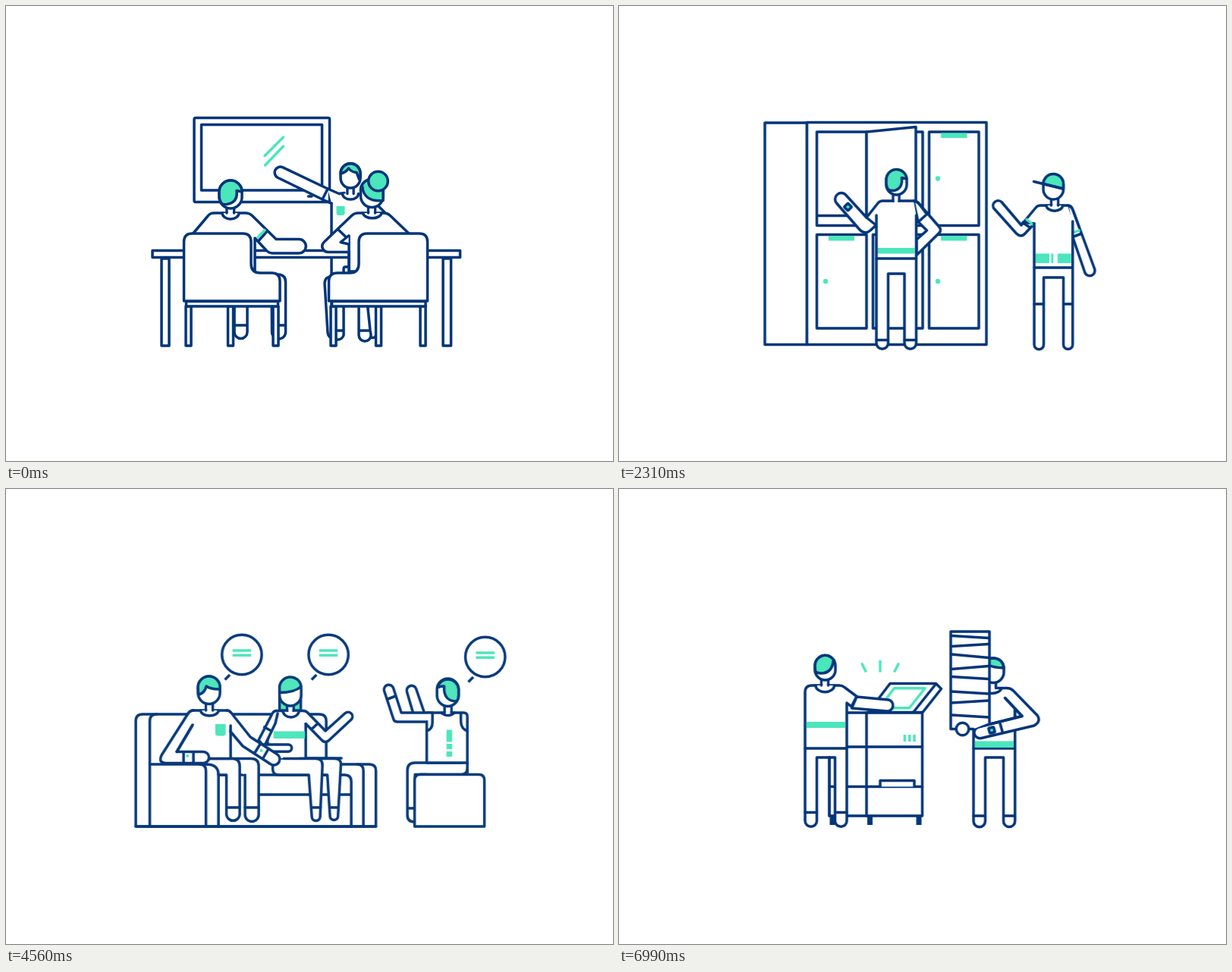
Animation of 800 by 600 pixels, one loop 8 s. Source, as an HTML page:

```html
<!DOCTYPE html>
<html lang="en">
<head>
<meta charset="utf-8">
<title>Office scenes</title>
<style>
html, body { margin: 0; width: 100%; height: 100%; overflow: hidden; background: #fff; }
svg { display: block; width: 100%; height: 100%; }
.scene {
  fill: #fff; stroke: #003579; stroke-width: 3.5;
  stroke-linecap: round; stroke-linejoin: round;
  animation: 8s linear infinite both;
}
.n { fill: none; }
.g { fill: #4be6bb; }
.p { fill: #4be6bb; stroke: none; }
.l { fill: none; stroke: #4be6bb; stroke-width: 3.4; stroke-linecap: butt; }
.w { stroke: none; }
.d { fill: #003579; stroke: none; }
.b { stroke-linecap: butt; }

#meeting { animation-name: meeting; }
#lockers { animation-name: lockers; }
#sofa { animation-name: sofa; }
#copier { animation-name: copier; }

/* leave: ease in over 505 ms; enter: ease out over 480 ms */
@keyframes meeting {
  0% { transform: none; opacity: 1; }
  13.5625% { transform: none; opacity: 1; animation-timing-function: cubic-bezier(.42, 0, .9, .9); }
  19.875%, 100% { transform: translateX(-247px); opacity: 0; }
}
@keyframes lockers {
  0%, 23.25% { transform: translateX(203px); opacity: 0; animation-timing-function: cubic-bezier(.215, .61, .355, 1); }
  29.25% { transform: none; opacity: 1; }
  42.8125% { transform: none; opacity: 1; animation-timing-function: cubic-bezier(.42, 0, .9, .9); }
  49.125%, 100% { transform: translateX(-247px); opacity: 0; }
}
@keyframes sofa {
  0%, 52.5% { transform: translateX(203px); opacity: 0; animation-timing-function: cubic-bezier(.215, .61, .355, 1); }
  58.5% { transform: none; opacity: 1; }
  72.0625% { transform: none; opacity: 1; animation-timing-function: cubic-bezier(.42, 0, .9, .9); }
  78.375%, 100% { transform: translateX(-247px); opacity: 0; }
}
@keyframes copier {
  0%, 81.75% { transform: translateX(203px); opacity: 0; animation-timing-function: cubic-bezier(.215, .61, .355, 1); }
  87.75%, 100% { transform: none; opacity: 1; }
}
</style>
</head>
<body>
<svg viewBox="0 0 800 600" xmlns="http://www.w3.org/2000/svg">

<g class="scene" id="meeting">
  <!-- screen -->
  <rect x="248" y="147.5" width="178.5" height="111" rx="2"/>
  <rect x="257.5" y="156.5" width="159" height="86.5"/>
  <path class="l" style="stroke-linecap:round" d="M341 197.500L365.500 173M341.500 210L365.500 185"/>
  <path d="M398.500 251H403"/>
  <!-- presenter -->
  <path class="w" d="M429 260L424 241L440 247.500H470L499 272V358H429Z"/>
  <path class="n" d="M429 260V358M424 241L439 247.500L446 246.500M490 263L499 272M445 352V346.500Q445 344 447.500 344H452"/>
  <path d="M424 241L364.500 212.700A7.500 7.500 0 0 0 358 226.200L417 255Z"/>
  <path class="n" d="M417 255L429 260.500"/>
  <path d="M443.500 247.500A10.500 7.500 0 0 0 464.500 247.500"/>
  <path d="M450 238V247.500M458 238V247.500"/>
  <path class="w" d="M451.750 238H456.250V250H451.750Z"/>
  <rect x="441" y="207.500" width="26" height="32.500" rx="13"/>
  <path class="g" d="M441 221A13 13 0 0 1 467 221V226L465.500 228.500L462 219.500Q456 219.500 451.500 214Q448 219.500 441 221Z"/>
  <path class="p" d="M435.500 264H446.500V273Q446.500 276 443.500 276H438.500Q435.500 276 435.500 273Z"/>
  <!-- table -->
  <rect x="205" y="333" width="10" height="115"/>
  <rect x="576" y="333" width="10.500" height="115"/>
  <rect x="193" y="322.500" width="405.500" height="9"/>
  <!-- left listener -->
  <path d="M301 390V430A8.500 8.500 0 0 0 318 430V390M301 421H318"/>
  <path d="M350 354H358Q368.500 354 368.500 364V430A9 9 0 0 1 350.500 430ZM351 421H368.500"/>
  <path d="M247 299.500L266 277Q269 273 274 273H316Q321 273 325 277L356 307.500H386A9.200 9.200 0 0 1 386 326H351Q346 326 342 321L328 306V350H247Z"/>
  <path class="n" d="M344.500 296.500L333.500 309"/>
  <path class="l" d="M342 294.500L331 306"/>
  <path d="M285 273A11 8 0 0 0 307 273"/>
  <path d="M291 264V273M300.500 264V273"/>
  <path class="w" d="M292.750 264H298.750V275H292.750Z"/>
  <rect x="281" y="230" width="30" height="37" rx="15"/>
  <path class="g" d="M281 245A15 15 0 0 1 311 245L304 243.500Q306 259 291 261.500Q287 262 285 261Q281 257 281 250Z"/>
  <!-- right listener -->
  <path d="M434 357Q420 355 420 366L424 431Q425 438 432 438V357Z"/>
  <path d="M429 390V434A8.300 8.300 0 0 0 445 434V390M430 428H445"/>
  <path d="M476 390L479 431Q480 438 484 437.500Q488 437 488 432V390Z"/>
  <path d="M465 390V434A8 8 0 0 0 481 434L480 428L476 390ZM465 428H480"/>
  <path d="M530.500 299.500L507 277Q503 273 498 273H464Q459 273 455 277L420 310.500Q415 315 417.500 320Q419.500 324.500 425 324.500H452V350H530Z"/>
  <path class="n" d="M437.500 294.500L449.500 306M452 303V350"/>
  <path d="M451.500 303L441 311.500L451.500 314"/>
  <path d="M470.500 273A12.300 7.500 0 0 0 495 273"/>
  <path d="M477.500 262V273M486.500 262V273"/>
  <path class="w" d="M479.250 262H484.750V275H479.250Z"/>
  <rect x="467.500" y="228.500" width="29.500" height="37" rx="14.700"/>
  <path class="g" d="M467.500 243A14.700 14.700 0 0 1 497 243V256.500Q471 259 469.500 237Z"/>
  <circle class="g" cx="490.500" cy="231" r="12.800"/>
  <!-- chairs -->
  <path d="M237 396H244V448H237ZM292.500 396H299.500V448H292.500ZM352 396H359V448H352ZM428 396H435V448H428ZM487.500 396H494.500V448H487.500ZM546 396H553V448H546Z"/>
  <path d="M237.500 389.500H358.500V396H237.500ZM429.500 389.500H553V396H429.500Z"/>
  <path d="M234.500 389V311Q234.500 300 245.500 300H312Q323 300 323 311V340Q323 352 335 352H350Q361 352 361 363V389Z"/>
  <path d="M555.500 389V311Q555.500 300 544.500 300H476Q465 300 465 311V340Q465 352 453 352H437Q425.500 352 425.500 363V389Z"/>
</g>

<g class="scene" id="lockers">
  <rect x="192" y="154" width="55.500" height="292.500"/>
  <rect x="247.500" y="153.500" width="236.500" height="293"/>
  <path d="M260.500 166H326V289.500H260.500ZM334.500 166H400V289.500H334.500ZM408.500 166H474V289.500H408.500ZM260.500 301.500H326V425H260.500ZM334.500 301.500H400V425H334.500ZM408.500 301.500H474V425H408.500ZM260.500 276.500H326"/>
  <path d="M326 166L391 159.500V296L326 289.500Z"/>
  <path class="p" d="M424 167.500H458.500V174H424ZM276 303H310V309.500H276ZM424 303H458.500V309.500H424Z"/>
  <g class="p"><circle cx="420" cy="227.500" r="3.200"/><circle cx="272" cy="363" r="3.200"/><circle cx="420" cy="363" r="3.200"/></g>
  <!-- man at the locker -->
  <path d="M388 257Q392 257 395 260.500L422 291.500Q425 295.500 422 299L392 328.500V308L405.500 296L394 284.500Z"/>
  <path class="w" d="M339 276L344 257H388L393 284L391.500 333H339Z"/>
  <path d="M326 279L299 249.500A8 8 0 0 0 286.500 260L317 295Q324 302 331 296L338.500 289Z"/>
  <path class="n" d="M326 279L341 260Q343.500 257 347 257H388Q392 257 395 260.500L405.500 274.500L394 285"/>
  <path d="M339 276V444.500A7.750 7.750 0 0 0 354.500 444.500V353H376V444.500A7.750 7.750 0 0 0 391.500 444.500V276"/>
  <path class="n" d="M339 333H391.500M339 440.500H354.500M376 440.500H391.500"/>
  <path class="p" d="M341 319H389.800V326.500H341Z"/>
  <rect class="g" x="298" y="261.500" width="7" height="7" rx="1" transform="rotate(45 301.500 265)"/>
  <path d="M361 246V257M369 246V257"/>
  <path class="w" d="M362.750 246H367.250V259H362.750Z"/>
  <rect x="352" y="216.500" width="27" height="32.500" rx="13.500"/>
  <path class="g" d="M352 230A13.500 13.500 0 0 1 379 228L372.500 226.500Q374 241 362 243.500Q358 244 354.500 242Q352 238 352 234Z"/>
  <!-- man with the cap -->
  <path d="M591 263Q596 263 598 269L626.500 346.500A6.800 6.800 0 0 1 613.800 351.500L597.500 304Z"/>
  <path class="w" d="M547 287L552 263H591L597.500 284V345H547Z"/>
  <path class="l" d="M599 298.500L607.500 295.500"/>
  <path class="n" d="M599 304L608.500 300.500"/>
  <path d="M532.500 285L530 289L504 258.500A6.700 6.700 0 0 0 493.500 266.500L523.500 300Q529.500 306 535 300L547 287Z"/>
  <path class="n" d="M531.500 287L549 266Q551.500 263 555 263H591Q596 263 598 269L606 291"/>
  <path class="n" d="M532.500 286L542 292.500"/>
  <path class="l" d="M536 280.500L546 289"/>
  <path d="M547 287V446.500A6.250 6.250 0 0 0 559.500 446.500V358H585.500V446.500A6.100 6.100 0 0 0 597.700 446.500V284"/>
  <path class="n" d="M547 345H597.500M547 393H559.500M585.500 393H597.500"/>
  <path class="p" d="M549 326.500H567V339H549ZM569.300 326.500H572.300V339H569.300ZM577.800 326.500H595.800V339H577.800Z"/>
  <path d="M563 263A10.500 7 0 0 0 584.500 263"/>
  <path d="M569.500 253V263M578.500 253V263"/>
  <path class="w" d="M571.250 253H576.750V265H571.250Z"/>
  <rect x="559" y="222" width="26.500" height="33" rx="13.200"/>
  <path class="g" d="M559 234.500A13.200 13.200 0 0 1 585.500 235V241Z"/>
  <path class="n" d="M546.500 231.500L585 241"/>
</g>

<g class="scene" id="sofa"><g transform="translate(1.2)">
  <!-- couch -->
  <path d="M165 445V306Q165 297 174 297H407Q416 297 416 306V445Z"/>
  <path class="n" d="M183.500 445V306Q183.500 297 192.500 297"/>
  <path d="M416 363H473Q481.500 363 481.500 371.500V445H416Z"/>
  <path class="n" d="M457 363Q465 363 465 371.500V445"/>
  <path d="M274 377H440Q449 377 449 386V445H274Z"/>
  <path class="n" d="M326 403H449"/>
  <path d="M436 355H353Q345.500 355 345.500 362V369Q345.500 377 353 377H436"/>
  <path d="M183.500 363H265Q274 363 274 372V445H183.500Z"/>
  <path class="n" d="M249 363Q257.500 363 257.500 372V445M165 445H481.500"/>
  <!-- woman -->
  <path class="w" d="M345 296L350 292H386L389 300V355H345Z"/>
  <path d="M350 292.500Q347 292.500 345 296L327 331L336 342L349 309L352 296"/>
  <path class="w" d="M346 309H353V334H340Z"/>
  <path class="n" d="M349 309L336 336M334.500 314L343.500 319"/>
  <path d="M333 337H366A4.600 4.600 0 0 1 366 346.200H345"/>
  <path d="M386 292.500Q390 292.500 392.500 296L415 319L440.500 296A5.800 5.800 0 0 1 449 304L419 332Q415 335 411 332L389 309.500"/>
  <path class="n" d="M405 309L396.500 317M350 292.500H386M389 310V355"/>
  <path class="p" d="M346.500 319.500H388V329H346.500Z"/>
  <path d="M359 292.500A10.500 8.500 0 0 0 380 292.500"/>
  <path class="g" d="M354.500 292V264H382.500V292Z"/>
  <path d="M364.500 280V292H373V280"/>
  <path class="w" d="M366.250 280H371.250V294.500H366.250Z"/>
  <rect x="354.500" y="250" width="28.500" height="36" rx="14.200"/>
  <path class="g" d="M354.500 268.500V264A14.200 14.200 0 0 1 383 260.500Q374 268.500 354.500 268.500Z"/>
  <path d="M381 355.500H427Q436 355.500 435.300 364L431.500 432A5.300 5.300 0 0 1 421 432L417.500 377H381"/>
  <path d="M360 355.500H402Q411.500 355.500 411 365L408 432A5.500 5.500 0 0 1 397 432L393 377H353"/>
  <path class="n" d="M396.500 420H408.500M420.500 420H432"/>
  <!-- man -->
  <path d="M266 355.500H317Q327 355.500 327 365.500V429.500A9 9 0 0 1 309 429.500V377"/>
  <path d="M258 355.500H292Q302 355.500 302 365.500V429.500A8.800 8.800 0 0 1 284.500 429.500V377H274Q274 363 258 363Z"/>
  <path class="n" d="M284.500 420H302M309 420H327"/>
  <path class="w" d="M240 292H285L290 300V355H222Z"/>
  <path class="n" d="M290 312V355.500H256"/>
  <path d="M241 292Q236.500 292 234 296L199 351Q194.500 361 204 361.500H254A7.400 7.400 0 0 0 254 346.500H219L240 311"/>
  <path class="w" d="M238.500 312L239 291.800L250 294V318Z"/>
  <path class="n" d="M241 292Q236.500 292 234 296M219 346.500L240 311M228 347V361M241 347V361"/>
  <circle class="p" cx="233" cy="352" r="2"/>
  <path d="M285 292Q288.500 292 291 295.500L316 327L351 349.500A7.700 7.700 0 0 1 343 363L306 339L290 320"/>
  <path class="w" d="M282 294L288.200 294L292 300V318L286 316Z"/>
  <path class="n" d="M241 292H285Q288.500 292 291 295.500M290 312V320M329.500 335.500L321.500 348.500M340 342.500L332.500 355.500"/>
  <circle class="p" cx="330.500" cy="345" r="2"/>
  <path class="p" d="M269.800 310H283.500V322Q283.500 325.500 280 325.500H273.500Q269.800 325.500 269.800 322Z"/>
  <path d="M250.500 292A11.700 7 0 0 0 274 292"/>
  <path d="M257.500 280V292M266.500 280V292"/>
  <path class="w" d="M259.250 280H264.750V294H259.250Z"/>
  <rect x="247" y="247" width="29" height="36.500" rx="14.500"/>
  <path class="g" d="M247.500 271.500L247 261.500A14.500 14.500 0 0 1 276 261.500V264Q265 264.500 258 260Q256 269 247.500 271.500Z"/>
  <!-- person on the stool -->
  <path d="M531 297L522.500 268A6.200 6.200 0 0 1 534.500 263.500L546 297"/>
  <path d="M556 295H515L504.500 262.500A6.200 6.200 0 0 0 492.500 266.500L504.500 303Q505.500 307 510 307H550"/>
  <path class="n" d="M497 277L507.500 273"/>
  <path d="M523 371Q523 361 533 361H602V376.500H533V439H532Q523 439 523 430ZM523 421H533"/>
  <path d="M602 361V368Q602 376.500 594 376.500H540"/>
  <path d="M548.500 361V295H597Q602 295 602 300V361Z"/>
  <path class="w" d="M546 296.800H553V305.200H546Z"/>
  <path class="n" d="M556 296V308Q556 317 548.500 319M593.500 296V307Q594 316.500 602 319"/>
  <path class="p" d="M574.500 317.500H582V333.500H574.500ZM574.500 336H582V343H574.500ZM574.500 346H582V353H574.500Z"/>
  <path d="M567.500 295Q576 302 585 295"/>
  <path d="M572 283V295M581 283V295"/>
  <path class="w" d="M573.750 283H579.250V296.500H573.750Z"/>
  <rect x="562" y="250" width="28.500" height="36.500" rx="14.200"/>
  <path class="g" d="M562.500 262A14.200 14.200 0 0 1 590.500 264V272Q590.500 277 588 280Q570 280 571.500 260Q567 259.500 562.500 262Z"/>
  <path d="M532.500 445V384Q532.500 376.500 540 376.500H617Q624.500 376.500 624.500 384V445Z"/>
  <!-- speech bubbles -->
  <g id="bubble">
    <circle cx="304.800" cy="218.500" r="26.200"/>
    <path class="b" d="M289 245L282.500 251.500"/>
    <path class="l" d="M292.500 213H317M292.500 219.200H317"/>
  </g>
  <use href="#bubble" x="114.200"/>
  <use href="#bubble" x="320.800" y="3"/>
</g></g>

<g class="scene" id="copier">
  <!-- copier -->
  <path class="d" d="M277.500 431H284.500V443H277.500ZM327 431H334V443H327ZM391.500 431H398.500V443H391.500Z"/>
  <path d="M277 295H399.500V431H277Z"/>
  <path class="n" d="M326 295V431M277 340H399.500M277 392.500H399.500"/>
  <path d="M344 392.500V384.500H389V392.500"/>
  <path class="p" d="M374.700 324H378.200V333H374.700ZM381 324H384.500V333H381ZM387.200 324H390.700V333H387.200Z"/>
  <path d="M328 294.500L357 256.500H417.500L424.500 263.500L400 294.500Z"/>
  <path class="n" d="M417.500 257L388 294"/>
  <path class="l" d="M362.500 262.800H403L382.500 288.800H342.500Z"/>
  <path class="l" d="M319.500 229.500L325.500 241.500M344 226V241.500M368.500 229.500L362.500 241.500"/>
  <!-- man at the copier -->
  <path class="w" d="M245 268L254 259H291L316 274L306 289L300 284V342H245Z"/>
  <path d="M245 342V437.500A7.750 7.750 0 0 0 260.500 437.500V354H284.500V437.500A7.750 7.750 0 0 0 300 437.500V282L306 287L313 273.500L297 261.500Q294 259 290 259H254Q245 259 245 268Z"/>
  <path class="n" d="M277 354V431M245 342H300M245 426.500H260.500M284.500 426.500H300"/>
  <path d="M313 274L355 278A7.600 7.600 0 0 1 353 293L306.500 289Z"/>
  <path class="p" d="M246.800 307H298.200V315H246.800Z"/>
  <path d="M259 259A12 8.500 0 0 0 283.500 259"/>
  <path d="M266.500 249V259M275.500 249V259"/>
  <path class="w" d="M268.250 249H273.750V261H268.250Z"/>
  <rect x="258" y="219.500" width="27" height="32.500" rx="13.500"/>
  <path class="g" d="M258 233A13.500 13.500 0 0 1 282.500 225Q281 243 266 243Q261 243 258.500 240.500Z"/>
  <!-- man with the papers -->
  <path class="w" d="M467 318L488 262.500H512L531 299L521.500 312V342H467Z"/>
  <path d="M467 318V438A7.750 7.750 0 0 0 482.500 438V354H506.500V438A7.600 7.600 0 0 0 521.700 438V290"/>
  <path class="n" d="M467 342H521.500M467 431H482.500M506.500 431H521.500"/>
  <path class="p" d="M468.800 332.500H520V341H468.800Z"/>
  <path d="M497 262.500H511Q516 262.500 519.500 266L551.500 299Q556 307 547 312L477.500 328.500A7.600 7.600 0 0 1 473 314L531 299.500L508.500 275.500"/>
  <path class="w" d="M507 277L511 266L496 264.300H490V300H516Z"/>
  <path class="n" d="M508.500 275.500L531 299.500L473 314M521.500 290V300M501.500 307.500L505.500 321.500"/>
  <path class="n" d="M486 269Q500 271 504 263M496.500 252V262.500"/>
  <rect x="479" y="223" width="28" height="32.500" rx="14"/>
  <path class="g" d="M479 232Q485 223 493 223Q506 224 507 236Q494 236 484 231Z"/>
  <path d="M467 316.500H437V188H488V308"/>
  <path class="n" d="M438 193.500L487 196.500M438 207.500L487 204.500M438 218L487 222.500M438 237.500L487 233.500M438 247.500L487 250.500M438 267L487 270M438 282L487 279M438 298L487 301"/>
  <rect class="g" x="487.500" y="314.500" width="7" height="7" rx="1" transform="rotate(-15 491 318)"/>
  <circle cx="452.500" cy="316.500" r="8.300"/>
</g>

</svg>
</body>
</html>
```
